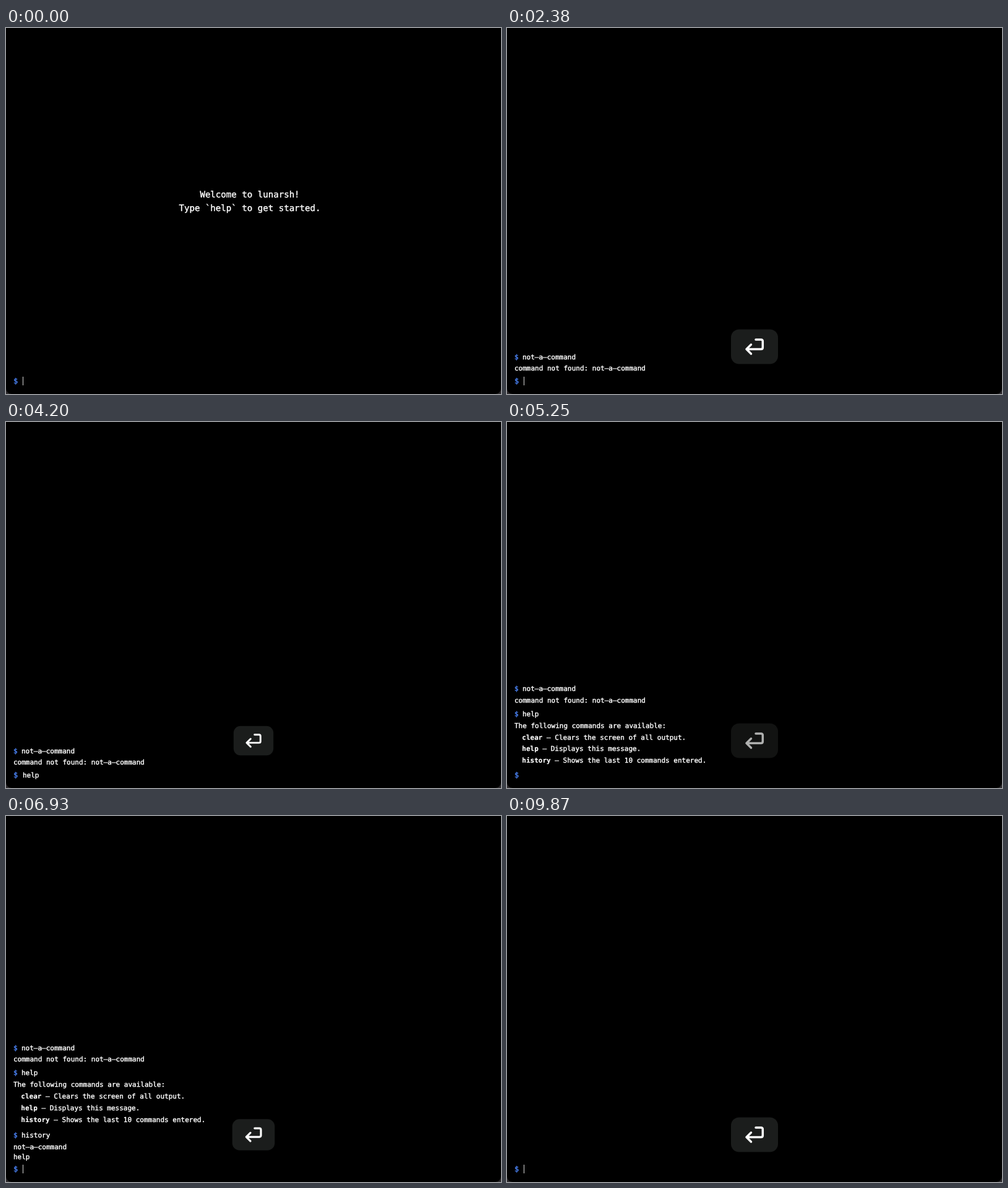
Write an HTML page with a canvas that moves like this. It is 800 px wide and 592 px high and loops after 9940 ms.

```html
<!DOCTYPE html>
<html lang="en">
<head>
<meta charset="utf-8">
<title>Terminal demo</title>
<style>
  html, body { margin: 0; width: 100%; height: 100%; overflow: hidden; background: #000; }
  canvas { display: block; }
</style>
</head>
<body>
<canvas id="stage" width="800" height="592"></canvas>
<script>
const ctx = document.getElementById('stage').getContext('2d');
const LOOP = 9940;
const FONT = '"DejaVu Sans Mono", monospace';
const WHITE = '#fff', BLUE = '#4a82f4';
const SIZE = 11, ADVANCE = SIZE * 0.602;

// Each command: time of every keystroke, then the time Enter is pressed.
const commands = [
  { text: 'not-a-command', enter: 2285,
    keys: [490, 600, 730, 850, 980, 1120, 1330, 1470, 1540, 1680, 1820, 1960, 2100] },
  { text: 'help', enter: 4180, keys: [3360, 3500, 3640, 3780] },
  { text: 'history', enter: 6885, keys: [5740, 5880, 6020, 6160, 6300, 6370, 6440] },
  { text: 'clear', enter: 9650, keys: [8260, 8470, 8610, 8750, 8890] },
];
const OUTPUT_DELAY = 40;
const cursorOff = [[2940, 3360], [3990, 4220], [5040, 5460], [6650, 6925], [7490, 8010], [9310, 9690]];

// Log rows: baseline once the log is full, text, kind.
const rows = [
  [378.7, 'not-a-command', 'prompt'],
  [397.4, 'command not found: not-a-command'],
  [419.4, 'help', 'prompt'],
  [438.4, 'The following commands are available:'],
  [457.1, 'clear - Clears the screen of all output.', 'item'],
  [475.9, 'help - Displays this message.', 'item'],
  [494.7, 'history - Shows the last 10 commands entered.', 'item'],
  [519.7, 'history', 'prompt'],
  [538.7, 'not-a-command'],
  [554.7, 'help'],
];
// Visible row count and downward shift after each command.
const logStates = [[0, 0], [2, 156.8], [7, 56.4], [10, 0], [0, 0]];

// A thin outline thickens the strokes; hyphens are drawn at full cell width.
function write(text, x, y, color = WHITE, size = SIZE, weight = 'normal') {
  const glyphs = text.replaceAll('-', '–');
  ctx.font = `${weight} ${size}px ${FONT}`;
  ctx.fillStyle = ctx.strokeStyle = color;
  ctx.lineWidth = weight === 'bold' ? 0.15 : 0.4;
  ctx.fillText(glyphs, x, y);
  ctx.strokeText(glyphs, x, y);
}

function drawRow([y, text, kind], shift) {
  y += shift;
  if (kind === 'prompt') {
    write('$', 12, y, BLUE);
    write(text, 25, y);
  } else if (kind === 'item') {
    const split = text.indexOf(' ');
    write(text.slice(0, split), 24.3, y, WHITE, SIZE, 'bold');
    write(text.slice(split), 24.3 + split * ADVANCE, y);
  } else {
    write(text, 12, y);
  }
}

function drawWelcome() {
  ctx.textAlign = 'center';
  write('Welcome to lunarsh!', 394, 274.2, WHITE, 14.1);
  write('Type `help` to get started.', 394, 296.2, WHITE, 14.1);
  ctx.textAlign = 'left';
}

function drawInput(t, command) {
  const typed = command ? command.text.slice(0, command.keys.filter(k => k <= t).length) : '';
  write('$', 12, 575, BLUE, 12);
  write(typed, 27, 574.8);
  if (!cursorOff.some(([from, to]) => t >= from && t < to)) {
    ctx.fillStyle = '#d8d8d8';
    ctx.fillRect(27 + Math.round(typed.length * ADVANCE), 564, 1, 14);
  }
}

function drawEnterKey(age) {
  const scale = 0.8 + 0.2 * Math.min(1, age / 90);
  const alpha = Math.min(1, 1 - (age - 1005) / 200);
  if (age < 0 || alpha <= 0) return;
  ctx.save();
  ctx.globalAlpha = alpha;
  ctx.translate(400, 515.5);
  ctx.scale(scale, scale);
  ctx.fillStyle = '#1b1d1c';
  ctx.beginPath();
  ctx.roundRect(-38, -28, 76, 56, 13);
  ctx.fill();
  ctx.strokeStyle = WHITE;
  ctx.lineWidth = 3.5;
  ctx.lineCap = ctx.lineJoin = 'round';
  ctx.stroke(new Path2D('M2 -11.5H10.5Q13.3 -11.5 13.3 -8.7V1.2Q13.3 4 10.5 4H-13M-5.5 -3.5L-13 4L-5.5 11.5'));
  ctx.restore();
}

function draw(t) {
  ctx.fillStyle = '#2a272a';
  ctx.fillRect(0, 0, 800, 592);
  ctx.fillStyle = '#000';
  ctx.beginPath();
  ctx.roundRect(0, 0, 800, 592, [0, 0, 9, 9]);
  ctx.fill();

  const done = commands.filter(c => t >= c.enter + OUTPUT_DELAY).length;
  const [count, shift] = logStates[done];
  if (!done) drawWelcome();
  rows.slice(0, count).forEach(row => drawRow(row, shift));
  drawInput(t, commands[done]);
  commands.forEach(c => drawEnterKey(t - c.enter));
}

ctx.textRendering = 'geometricPrecision';
ctx.lineJoin = 'round';
const start = performance.now();
function tick() {
  draw((performance.now() - start) % LOOP);
  requestAnimationFrame(tick);
}
tick();
</script>
</body>
</html>
```
